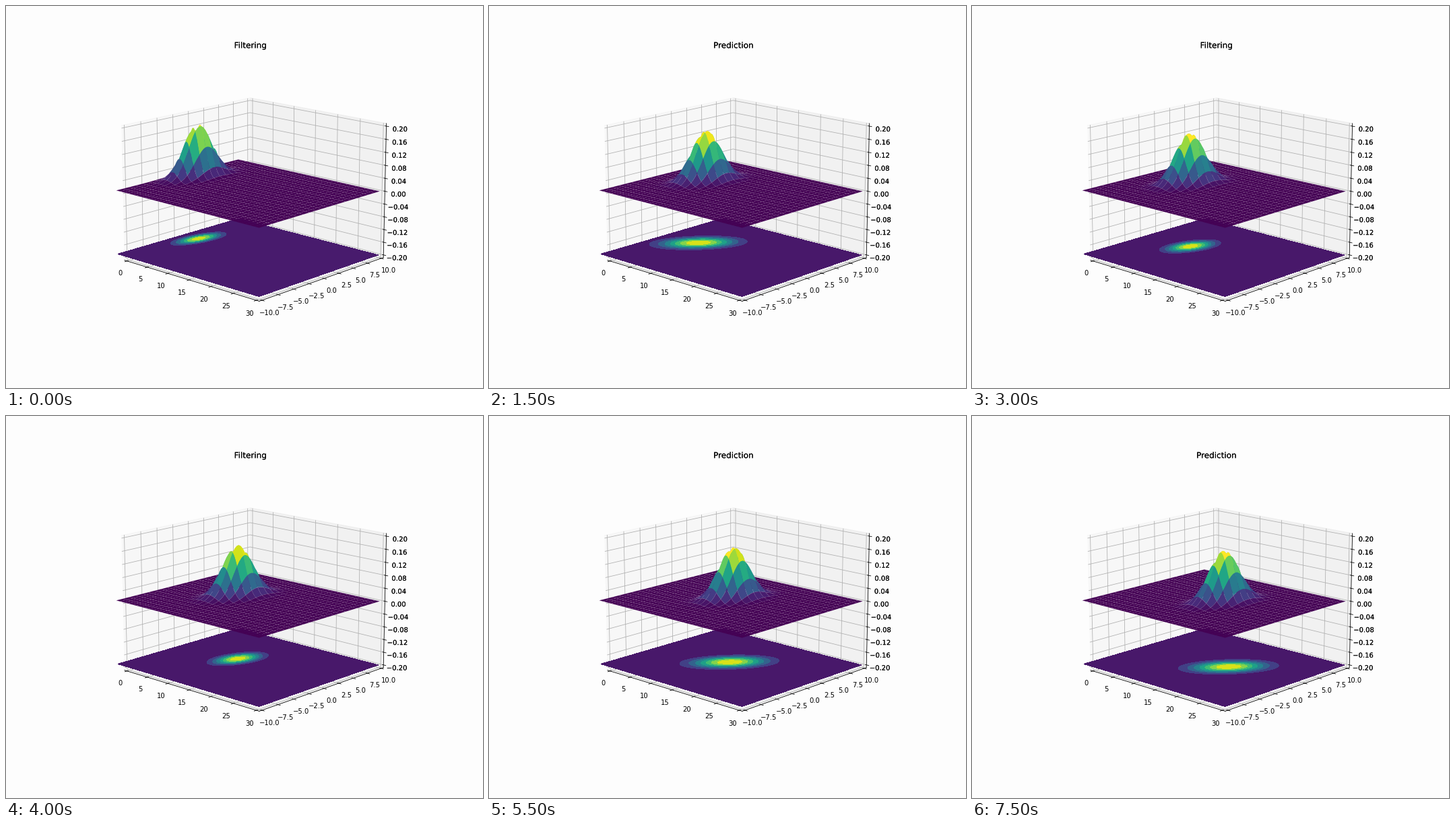
A matplotlib script for the animation above (8000 ms loop, 708x566 px).

```python
import numpy as np
import matplotlib.pyplot as plt
from matplotlib import patheffects
from matplotlib.animation import FuncAnimation

W, H, DPI = 708, 566, 72
STEP_MS, FRAMES = 500, 16

# Filtered state (x, y) after each measurement
STATES = [(0.64, 0.64), (2.64, 0.76), (5.87, 1.28), (7.22, 0.46), (9.9, 0.85),
          (10.4, 0.58), (12.7, 1.0), (14.24, 0.52), (15.25, 0.44)]
VELOCITY = 1.98

# Each shape: variance x, variance y, covariance, peak
START = (1.7, 3.9, 0.75, 0.168)
FILTERED = (2.9, 3.5, 1.05, 0.158)
PREDICTED = (9.8, 5.4, 4.5, 0.0795)

X, Y = np.meshgrid(np.linspace(-3, 30, 100), np.linspace(-10, 10, 61))


def bell(mean, shape):
    vx, vy, c, peak = shape
    dx, dy = X - mean[0], Y - mean[1]
    q = (vy * dx**2 - 2 * c * dx * dy + vx * dy**2) / (vx * vy - c**2)
    return peak * np.exp(-q / 2)


def padded(lo, hi):
    pad = (hi - lo) / 48
    return lo - pad, hi + pad


fig = plt.figure(figsize=(W / DPI, H / DPI), dpi=DPI, facecolor="#fdfdfd")
side = 427.4
ax = fig.add_axes([149.1 / W, 70.3 / H, side / W, side / H],
                  projection="3d", computed_zorder=False)
ax.patch.set_visible(False)
ax.view_init(15, -47)
ax.set_xlim(*padded(0, 30))
ax.set_ylim(*padded(-10, 10))
ax.set_zlim(*padded(-0.2, 0.2))
ax.set_xticks(range(0, 31, 5))
ax.set_yticks(np.linspace(-10, 10, 9))
ax.set_zticks(np.linspace(-0.2, 0.2, 11))

# Doubled lettering on the title and the vertical scale
doubled = [patheffects.Normal(offset=(dx, 0)) for dx in (-0.5, 0.5)]
title = ax.set_title("Filtering", fontsize=12)
for label in [title, *ax.zaxis.get_ticklabels()]:
    label.set_path_effects(doubled)

shown = []


def draw(i):
    while shown:
        shown.pop().remove()
    k = (i + 1) // 2
    predicting = i % 2 == 1
    hill = bell(STATES[k], FILTERED if k else START)
    floor = hill
    if predicting:
        x, y = STATES[k - 1]
        floor = bell((x + VELOCITY, y), PREDICTED)
    title.set_text("Prediction" if predicting else "Filtering")
    shown.append(ax.contourf(X, Y, floor, zdir="z", offset=-0.2,
                             cmap="viridis", zorder=1))
    shown.append(ax.plot_surface(X, Y, hill, rstride=3, cstride=3, linewidth=1,
                                 antialiased=True, cmap="viridis", zorder=2))
    return shown


anim = FuncAnimation(fig, draw, frames=FRAMES, interval=STEP_MS,
                     repeat=True, repeat_delay=0, blit=False)
plt.show()
```
